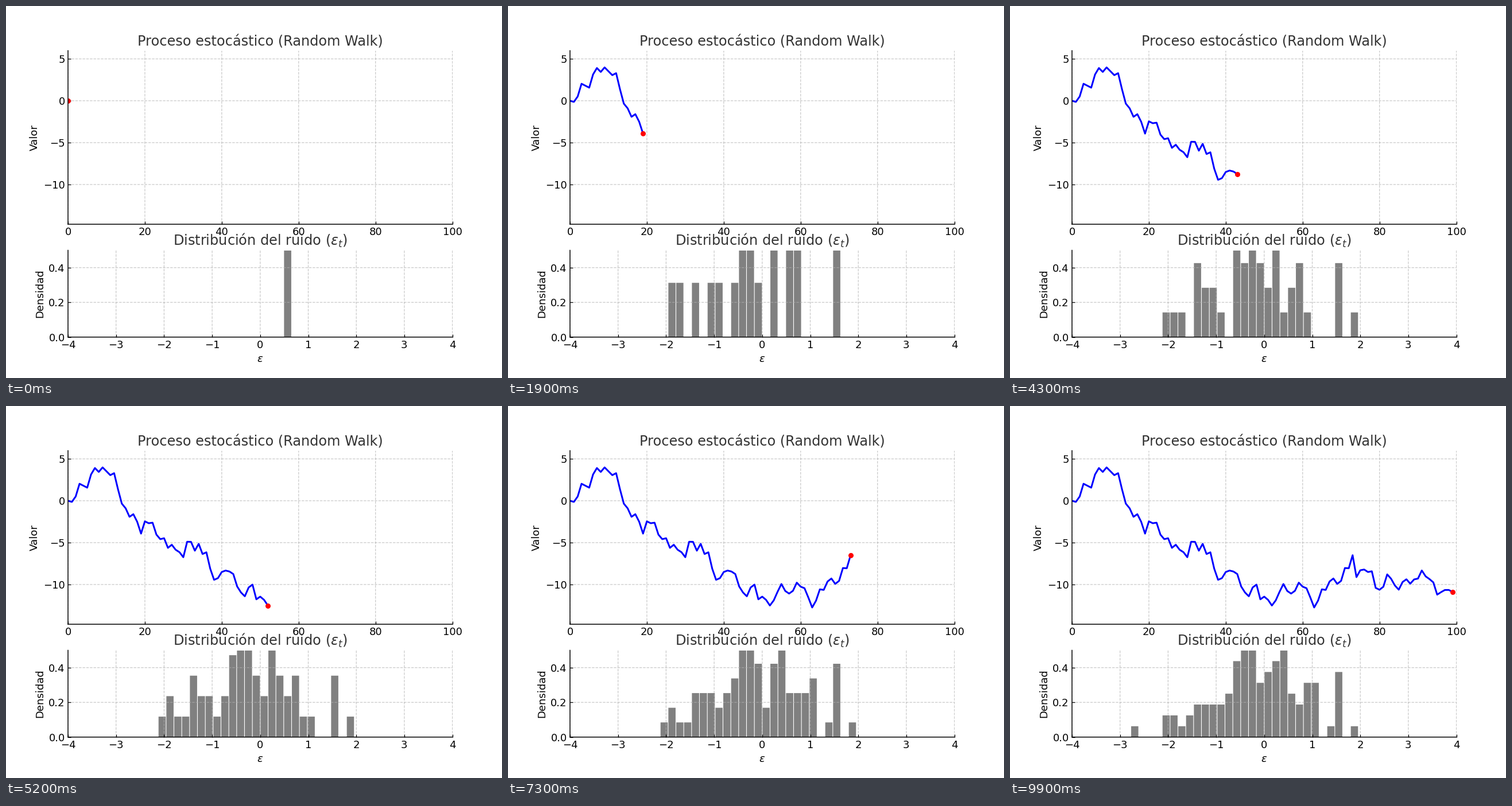
Animation, 864 px wide and 648 px high, one loop 10 s. Source, as a matplotlib script:

```python
import numpy as np
import matplotlib.pyplot as plt
from matplotlib.animation import FuncAnimation

plt.rcParams.update({
    "font.family": "DejaVu Sans",
    "font.size": 12,
    "axes.titlesize": 16,
    "axes.titlecolor": "#333333",
    "axes.titlepad": 5.6,
    "axes.labelsize": 12,
    "axes.linewidth": 1.0,
    "axes.spines.top": False,
    "axes.spines.right": False,
    "axes.grid": True,
    "axes.axisbelow": "line",
    "grid.linestyle": "--",
    "grid.color": "#b0b0b0",
    "grid.alpha": 0.7,
    "xtick.direction": "in",
    "ytick.direction": "in",
    "path.snap": False,
})

STEPS = 100
BINS = 50

# Random walk starting at zero
np.random.seed(42)
noise = np.random.normal(0, 1, STEPS)
walk = np.concatenate([[0], np.cumsum(noise[1:])])

fig, (ax_walk, ax_hist) = plt.subplots(
    2, 1, figsize=(8, 6), dpi=108, gridspec_kw={"height_ratios": [2, 1]})

ax_walk.set_title("Proceso estocástico (Random Walk)")
ax_walk.set_ylabel("Valor")
ax_walk.set_xticks(range(0, 101, 20))
ax_walk.set_yticks([-10, -5, 0, 5])
ax_walk.set_xlim(0, STEPS)
ax_walk.set_ylim(walk.min() - 2, walk.max() + 2)
path, = ax_walk.plot([], [], color="blue", lw=2)
dot, = ax_walk.plot([], [], "ro", ms=6, mew=0, snap=False)

ax_hist.set_title(r"Distribución del ruido ($\varepsilon_t$)")
ax_hist.set_xlabel(r"$\varepsilon$")
ax_hist.set_ylabel("Densidad")
ax_hist.set_xticks(range(-4, 5))
ax_hist.set_yticks([0, 0.2, 0.4])
bars = ax_hist.bar(np.linspace(-4, 4, BINS), np.zeros(BINS), width=0.15,
                   color="gray", linewidth=0, snap=False)
ax_hist.set_xlim(-4, 4)
ax_hist.set_ylim(0, 0.5)


def update(t):
    path.set_data(np.arange(t + 1), walk[:t + 1])
    dot.set_data([t], [walk[t]])
    density, _ = np.histogram(noise[:t + 1], bins=BINS, range=(-4, 4),
                              density=True)
    for bar, height in zip(bars, density):
        bar.set_height(height)
    return path, dot, *bars


anim = FuncAnimation(fig, update, frames=STEPS, interval=100,
                     repeat=True, repeat_delay=0, blit=False)
plt.show()
```
